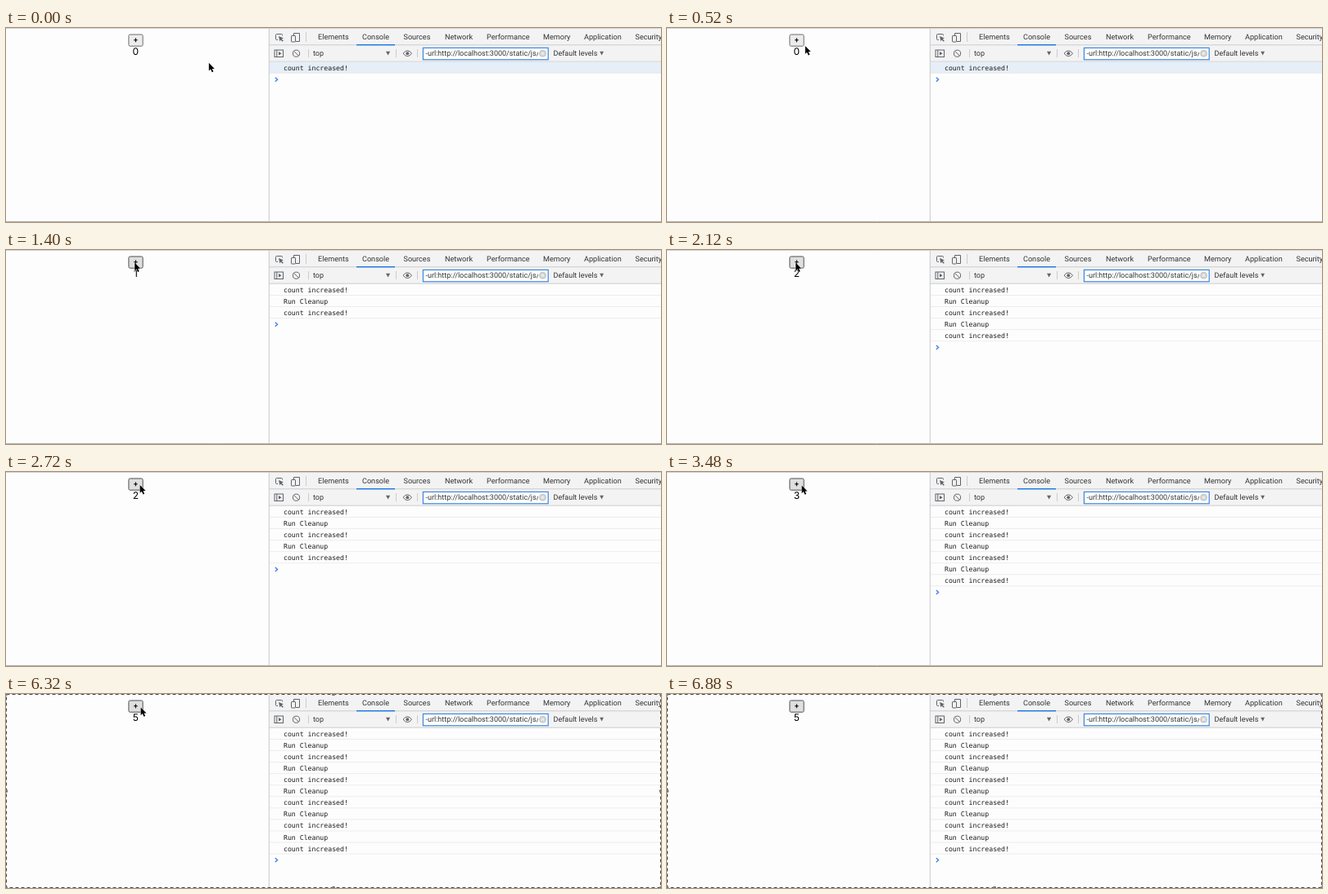
An HTML page for the animation above (8.88 s loop, 800x238 px).

```html
<!DOCTYPE html>
<html lang="en">
<head>
<meta charset="utf-8">
<title>Counter and console</title>
<style>
  html, body { margin: 0; width: 100%; height: 100%; overflow: hidden; background: #fefdfe; }
  svg { display: block; width: 100%; height: 100%; }
  text { font-family: Roboto, "Liberation Sans", sans-serif; font-size: 9.1px; fill: #333; text-rendering: geometricPrecision; white-space: pre; }
  .tool { font-size: 9px; }
  .mono text { font-family: "DejaVu Sans Mono", monospace; font-size: 8.2px; fill: #1a1a1a; }
  .icon { fill: none; stroke: #5f6368; stroke-width: 1; }
  .rule { stroke: #ccc; stroke-width: 1; }
  #plus { font-size: 9.5px; font-weight: 500; fill: #000; }
  #count { font-family: Inter, sans-serif; font-size: 12px; fill: #000; }
</style>
</head>
<body>
<svg viewBox="0 0 800 238" id="stage">
  <rect width="800" height="238" fill="#fefdfe"/>

  <rect x="321" y="1" width="479" height="40" fill="#f3f3f3"/>
  <path class="rule" d="M321 20.8H800M321 41.2H800M366.5 5V17M369.5 26V36M476.5 26V36M502.5 26V36"/>
  <path d="M0 .5H800" stroke="#d2d2d2"/>
  <path d="M321.3 1V237" stroke="#c8c8c8"/>
  <path d="M0 237.5H800" stroke="#b0b0b0"/>
  <rect x="428" y="20" width="47" height="1.4" fill="#1a73e8"/>
  <g id="tabs"></g>

  <g class="icon">
    <path d="M332 14.5H330.5Q329.5 14.5 329.5 13.5V8.5Q329.5 7.5 330.5 7.5H336.5Q337.5 7.5 337.5 8.5V9.5"/>
    <path d="M333 10L339 12.4L336.6 13.4L338.9 15.8L337.8 16.8L335.6 14.6L334.5 16.6Z" fill="#5f6368" stroke="none"/>
    <path d="M351.5 9V6.5H358.5V16.5H354"/>
    <rect x="348.5" y="9.5" width="5" height="7.5" rx=".6"/>
    <rect x="328" y="27" width="10.5" height="8.5"/>
    <path d="M330.8 27V35.5"/>
    <path d="M333 29L336.6 31.2L333 33.5Z" fill="#5f6368" stroke="none"/>
    <circle cx="354.5" cy="31.2" r="4.1"/>
    <path d="M351.6 28.3L357.4 34.1"/>
    <path d="M485 31.2Q490.3 24.4 495.6 31.2Q490.3 38 485 31.2Z"/>
    <circle cx="490.3" cy="31.2" r="1.9" fill="#5f6368" stroke="none"/>
  </g>
  <text class="tool" x="375" y="34.4">top</text>
  <path d="M464 28.8H469.2L466.6 33.6ZM725.2 28.8H730L727.6 33.4Z" fill="#666"/>
  <rect x="509.4" y="24.4" width="152.8" height="14.4" fill="#fff" stroke="#3b87e0" stroke-width="1.2"/>
  <clipPath id="field"><rect x="511" y="25" width="139" height="13"/></clipPath>
  <text class="tool" x="512.5" y="34.4" clip-path="url(#field)">-url:http://localhost:3000/static/js/0</text>
  <circle cx="655.5" cy="31.2" r="4" fill="#d4d4d4" stroke="#aaa" stroke-width=".6"/>
  <path d="M653.9 29.6L657.1 32.8M657.1 29.6L653.9 32.8" stroke="#fff"/>
  <text class="tool" x="668.5" y="34.4">Default levels</text>

  <rect id="highlight" x="322" y="41.7" width="478" height="14" fill="#e6eef7"/>
  <g class="mono" id="log"></g>
  <path id="prompt" d="M328.8 -2.5L331.6 0L328.8 2.5" fill="none" stroke="#367cf1" stroke-width="1.3"/>

  <rect id="button" x="149.9" y="8" width="17.2" height="14.2" rx="1.6"/>
  <text id="plus" x="158.5" y="18.4" text-anchor="middle">+</text>
  <text id="count" x="158.4" y="33.3" text-anchor="middle"></text>

  <g id="selection">
    <rect x=".5" y=".5" width="799" height="237" fill="none" stroke="#fff"/>
    <rect x=".5" y=".5" width="799" height="237" fill="none" stroke="#444" stroke-dasharray="4 3"/>
    <path d="M0 119h.01M800 119h.01M400 0h.01M400 238h.01M0 0h.01M800 0h.01M0 238h.01M800 238h.01"
      stroke="#777" stroke-width="4.4" stroke-linecap="round"/>
  </g>
  <path id="cursor" d="M0 0V9.8L2.2 7.7L3.8 11.4L5.5 10.7L3.9 7.1H6.9Z" fill="#000" stroke="#fff" stroke-width=".8" paint-order="stroke"/>
</svg>
<script>
const LOOP = 8880, STEP = 40, ROW = 14.06;
const SELECT_AT = 6320, HIDE_AT = 6880, HOVER_AT = 560;

// Mouse press and release times
const clicks = [[960, 1080], [1960, 2120], [3080, 3240], [4160, 4320], [5280, 5360]];

// Cursor tip: time, x, y
const path = [
  [40, 247.8, 42.8], [280, 200, 31.5], [520, 168.8, 22], [600, 162, 18.5],
  [800, 162, 18.5], [960, 158.2, 15.6], [1320, 158.2, 15.6], [1400, 157.2, 15.6],
  [2520, 157.2, 15.6], [2720, 163.6, 16], [2840, 164, 16.2],
  [3440, 164, 16.2], [3480, 164.6, 16.4], [6760, 164.6, 16.4], [6840, 493, 212]
];
const tabs = [["Elements", 381], ["Console", 435], ["Sources", 485.5], ["Network", 536],
  ["Performance", 587], ["Memory", 656], ["Application", 706], ["Security", 768.5]];

const $ = id => document.getElementById(id);
const show = (node, visible) => node.setAttribute("visibility", visible ? "visible" : "hidden");

function add(parent, name, attrs, content = "") {
  const node = document.createElementNS("http://www.w3.org/2000/svg", name);
  for (const key in attrs) node.setAttribute(key, attrs[key]);
  node.textContent = content;
  parent.append(node);
  return node;
}

for (const [label, x] of tabs) {
  add($("tabs"), "text", { x, y: 14.4 }, label);
}

const rows = Array.from({ length: 1 + 2 * clicks.length }, (_, i) => {
  const row = add($("log"), "g", { transform: `translate(0 ${i * ROW})` });
  add(row, "path", { d: "M322 55.5H800", stroke: "#ececee" });
  add(row, "text", { x: 339, y: 52 }, i % 2 ? "Run Cleanup" : "count increased!");
  return row;
});

function cursorAt(t) {
  const next = path.findIndex(p => p[0] > t);
  if (next === 0) return path[0].slice(1);
  if (next < 0) return path[path.length - 1].slice(1);
  const [t0, x0, y0] = path[next - 1], [t1, x1, y1] = path[next];
  const k = (t - t0) / (t1 - t0);
  return [x0 + (x1 - x0) * k, y0 + (y1 - y0) * k];
}

function buttonColors(t) {
  if (clicks.some(([down, up]) => t >= down && t < up)) return ["#f5f5f5", "#8d8d8d"];
  return t >= HOVER_AT ? ["#dfdfdf", "#4f4f4f"] : ["#ececec", "#6c6c6c"];
}

function draw(time) {
  const t = Math.floor(time % LOOP / STEP) * STEP;
  const count = clicks.filter(([, up]) => t >= up).length;
  const lines = 1 + 2 * count;
  const [fill, stroke] = buttonColors(t);

  $("count").textContent = count;
  $("button").setAttribute("fill", fill);
  $("button").setAttribute("stroke", stroke);
  rows.forEach((row, i) => show(row, i < lines));
  $("prompt").setAttribute("transform", `translate(0 ${49.1 + lines * ROW})`);
  show($("highlight"), count === 0);
  show($("selection"), t >= SELECT_AT);
  show($("cursor"), t < HIDE_AT);
  $("cursor").setAttribute("transform", `translate(${cursorAt(t)})`);
}

const start = performance.now();
function tick() {
  draw(performance.now() - start);
  requestAnimationFrame(tick);
}
tick();
</script>
</body>
</html>
```
